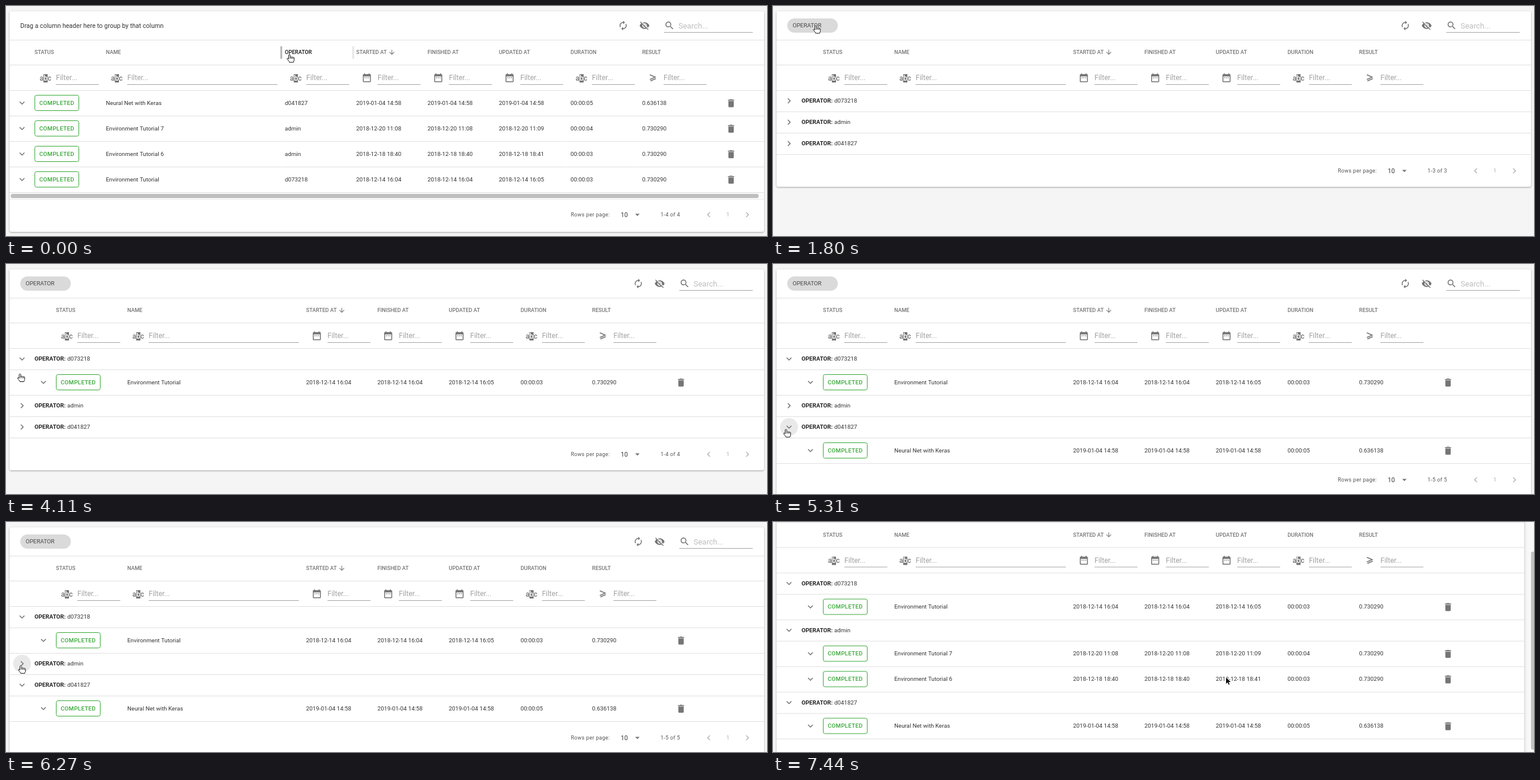
An HTML page with a canvas for the animation above (7470 ms loop, 1280 px wide and 388 px high).

```html
<!DOCTYPE html>
<html lang="en">
<head>
<meta charset="utf-8">
<title>Grouping a data grid</title>
<style>
html, body { margin: 0; width: 100%; height: 100%; overflow: hidden; background: #f5f5f5; }
canvas { display: block; }
</style>
</head>
<body>
<canvas id="stage" width="1280" height="388"></canvas>
<script>
const ctx = document.getElementById('stage').getContext('2d');
const LOOP = 7470;
const DRAG = 450, REORDER = 780, RESTORE = 825, PREVIEW = 1020, DROP = 1530;
const SCROLL = 6690, LEAVE = 6950;
const GREY = '#757575', INK = '#333', LINE = '#e0e0e0', GREEN = '#38a838';

const icons = {
  renew: 'M12 6v3l4-4-4-4v3c-4.42 0-8 3.58-8 8 0 1.57.46 3.03 1.24 4.26L6.7 14.8c-.45-.83-.7-1.79-.7-2.8 0-3.31 2.69-6 6-6zm6.76 1.74L17.3 9.2c.44.84.7 1.79.7 2.8 0 3.31-2.69 6-6 6v-3l-4 4 4 4v-3c4.42 0 8-3.58 8-8 0-1.57-.46-3.03-1.24-4.26z',
  hide: 'M12 7c2.76 0 5 2.24 5 5 0 .65-.13 1.26-.36 1.83l2.92 2.92c1.51-1.26 2.7-2.89 3.43-4.75-1.73-4.39-6-7.5-11-7.5-1.4 0-2.74.25-3.98.7l2.16 2.16C10.74 7.13 11.35 7 12 7zM2 4.27l2.28 2.28.46.46C3.08 8.3 1.78 10.02 1 12c1.73 4.39 6 7.5 11 7.5 1.55 0 3.03-.3 4.38-.84l.42.42L19.73 22 21 20.73 3.27 3 2 4.27zM7.53 9.8l1.55 1.55c-.05.21-.08.43-.08.65 0 1.66 1.34 3 3 3 .22 0 .44-.03.65-.08l1.55 1.55c-.67.33-1.41.53-2.2.53-2.76 0-5-2.24-5-5 0-.79.2-1.53.53-2.2zm4.31-.78l3.15 3.15.02-.16c0-1.66-1.34-3-3-3l-.17.01z',
  search: 'M15.5 14h-.79l-.28-.27C15.41 12.59 16 11.11 16 9.5 16 5.91 13.09 3 9.5 3S3 5.91 3 9.5 5.91 16 9.5 16c1.61 0 3.09-.59 4.23-1.57l.27.28v.79l5 4.99L20.49 19l-4.99-5zm-6 0C7.01 14 5 11.99 5 9.5S7.01 5 9.5 5 14 7.01 14 9.5 11.99 14 9.5 14z',
  date: 'M9 11H7v2h2v-2zm4 0h-2v2h2v-2zm4 0h-2v2h2v-2zm2-7h-1V2h-2v2H8V2H6v2H5c-1.11 0-1.99.9-1.99 2L3 20c0 1.1.89 2 2 2h14c1.1 0 2-.9 2-2V6c0-1.1-.9-2-2-2zm0 16H5V9h14v11z',
  trash: 'M6 19c0 1.1.9 2 2 2h8c1.1 0 2-.9 2-2V7H6v12zM19 4h-3.5l-1-1h-5l-1 1H5v2h14V4z',
  down: 'M16.59 8.59L12 13.17 7.41 8.59 6 10l6 6 6-6z',
  right: 'M10 6L8.59 7.41 13.17 12l-4.58 4.59L10 18l6-6z',
  left: 'M15.41 7.41L14 6l-6 6 6 6 1.41-1.41L10.83 12z',
  caret: 'M7 10l5 5 5-5z',
  sort: 'M20 12l-1.41-1.41L13 16.17V4h-2v12.17l-5.58-5.59L4 12l8 8 8-8z'
};
for (const name in icons) icons[name] = new Path2D(icons[name]);

const pointers = {
  hand: new Path2D('M-1.5 1c0-1.4 2.4-1.4 2.6 0v3.6l.4-.2c.3-.9 2-.8 2.2.1.4-.8 2-.5 2.1.4.5-.6 1.9-.3 1.9.8v3c0 2.2-1 2.3-1.2 4.3H-.3C-.6 11-3 9.5-4 7.3c-.5-1.2.9-1.9 1.7-.9l.8 1z'),
  arrow: new Path2D('M0 0v11l2.6-2.4 1.7 3.9 1.7-.8-1.7-3.7h3.6z'),
  move: new Path2D('M-5 0H5M0-5V5M-1.5-3.5L0-5 1.5-3.5M-1.5 3.5L0 5 1.5 3.5M-3.5-1.5L-5 0-3.5 1.5M3.5-1.5L5 0 3.5 1.5')
};

const UNIT = 120.2;
const columns = [
  ['STATUS', 48, 'text'], ['NAME', 168, 'text'], ['OPERATOR', 469, 'text'],
  ['STARTED AT', 589, 'date'], ['FINISHED AT', 709, 'date'], ['UPDATED AT', 829, 'date'],
  ['DURATION', 949.6, 'text'], ['RESULT', 1070, 'number']
].map(([title, x, kind]) => ({ title, x, kind, width: title === 'NAME' ? 300.6 : UNIT }));

// One entry per run, in column order after the status
const runs = [
  ['Neural Net with Keras', 'd041827', '2019-01-04 14:58', '2019-01-04 14:58', '2019-01-04 14:58', '00:00:05', '0.636138'],
  ['Environment Tutorial 7', 'admin', '2018-12-20 11:08', '2018-12-20 11:08', '2018-12-20 11:09', '00:00:04', '0.730290'],
  ['Environment Tutorial 6', 'admin', '2018-12-18 18:40', '2018-12-18 18:40', '2018-12-18 18:41', '00:00:03', '0.730290'],
  ['Environment Tutorial', 'd073218', '2018-12-14 16:04', '2018-12-14 16:04', '2018-12-14 16:05', '00:00:03', '0.730290']
];
const groups = [
  { operator: 'd073218', opens: 3420 },
  { operator: 'admin', opens: 6480 },
  { operator: 'd041827', opens: 4770 }
];

// Pointer hotspot: time, x, y
const path = [
  [0, 477, 82], [DRAG, 477, 82], [750, 467, 65], [REORDER, 455, 63], [930, 197, 44], [1100, 78, 34],
  [1470, 72, 33], [2430, 72, 33], [2850, 24, 170], [3150, 24, 170], [3240, 24, 168], [3930, 24, 168],
  [4650, 22, 279], [5340, 22, 279], [5850, 25, 242], [LEAVE, 25, 243], [7440, 762, 262]
];

const clamp = v => Math.max(0, Math.min(1, v));
const easeOut = (v, power) => 1 - (1 - clamp(v)) ** power;

function pointerAt(t) {
  const i = path.findIndex(key => key[0] > t);
  if (i < 0) return path[path.length - 1].slice(1);
  const [a, b] = [path[i - 1], path[i]];
  let u = (t - a[0]) / (b[0] - a[0]);
  if (t > DROP) u = u * u * (3 - 2 * u);
  return [a[1] + (b[1] - a[1]) * u, a[2] + (b[2] - a[2]) * u];
}

function text(str, x, middle, size = 9.75, color = INK, weight = 400, spacing = 0) {
  ctx.font = `${weight} ${size}px Roboto, sans-serif`;
  ctx.letterSpacing = spacing + 'px';
  ctx.fillStyle = color;
  ctx.fillText(str, x, middle + size * .355);
}

function icon(name, x, y, color = GREY, size = 18) {
  ctx.save();
  ctx.translate(x - size / 2, y - size / 2);
  ctx.scale(size / 24, size / 24);
  ctx.fillStyle = color;
  ctx.fill(icons[name]);
  ctx.restore();
}

function rect(x, y, w, h, color, radius = 0) {
  ctx.fillStyle = color;
  ctx.beginPath();
  ctx.roundRect(x, y, w, h, radius);
  ctx.fill();
}

const rule = (x1, x2, y, color = LINE) => rect(x1, y, x2 - x1, 1, color);

function chip(x, y, width, pad) {
  rect(x, y, width, 24, '#dadada', 12);
  text('OPERATOR', x + pad, y + 12, 9.75, '#444');
}

function toolbar(t, right) {
  const grouped = t >= PREVIEW;
  if (grouped) {
    ctx.globalAlpha = t < DROP ? .4 : 1;
    chip(24, 21, 85, 9);
    ctx.globalAlpha = 1;
  } else {
    text('Drag a column header here to group by that column', 24, 33, 10.5, INK, 400, .05);
  }
  const x = right - 1275 + (grouped ? 25.5 : 0);
  icon('renew', x + 1038, 33);
  icon('hide', x + 1074, 33);
  icon('search', x + 1116, 33);
  text('Search...', x + 1131, 33, 13, '#bdbdbd');
  rule(x + 1107, right - 19, 44, '#a5a5a5');
  rule(6, right, 57);
}

function filterIcon(kind, x) {
  if (kind === 'date') return icon('date', x + 18, 121);
  if (kind === 'text') {
    text('a', x + 8.5, 121.5, 12, GREY, 500);
    rect(x + 15, 115, 7, 14, GREY);
    text('b', x + 15.2, 121.5, 12, '#fff', 500);
    text('c', x + 22, 121.5, 12, GREY, 500);
    return;
  }
  ctx.strokeStyle = GREY;
  ctx.lineWidth = 1.6;
  ctx.stroke(new Path2D(`M${x + 13} 116l9 4-9 4M${x + 23} 122.5l-9 4`));
}

function header(t, cols) {
  for (const { title, x, width, kind } of cols) {
    const isOperator = title === 'OPERATOR';
    const color = !isOperator ? GREY : t < DRAG ? '#111' : '#ccc';
    text(title, x, 78, 9, color, 500);
    if (title === 'STARTED AT') icon('sort', x + 60, 78, GREY, 13);
    if (isOperator && t < DRAG) {
      rect(x - 7.5, 68, 3, 21, '#b5b5b5');
      rect(x + 113.5, 68, 3, 21, '#e6e6e6');
    }
    filterIcon(kind, x);
    text('Filter...', x + 36, 121, 12, '#a2a2a2');
    rule(x + 36, x + width - 12, 132, '#a5a5a5');
  }
}

function runRow(run, y, cols) {
  const middle = y + 21.5, left = cols[0].x;
  icon('down', left - 21, middle);
  ctx.strokeStyle = GREEN;
  ctx.lineWidth = 1;
  ctx.beginPath();
  ctx.roundRect(left + .5, middle - 13, 74, 26, 3);
  ctx.stroke();
  text('COMPLETED', left + 8, middle, 9.75, GREEN, 500, .25);
  for (const col of cols) {
    const i = columns.findIndex(c => c.title === col.title);
    if (i > 0) text(run[i - 1], col.x, middle);
  }
  icon('trash', cols[cols.length - 1].x + 149.6, middle + .5);
}

function groupRow(group, y, open, [px, py]) {
  const middle = y + 18;
  if (Math.abs(px - 27) < 15 && Math.abs(py - middle) < 16) rect(12, middle - 15, 30, 30, '#e9e9e9', 15);
  icon(open ? 'down' : 'right', 27, middle);
  text('OPERATOR:', 48, middle, 9.75, '#222', 700);
  text(group.operator, 103, middle);
}

function pager(y, count) {
  text('Rows per page:', 950, y, 9, '#555', 400, .3);
  text('10', 1034, y, 10.5);
  icon('caret', 1062, y);
  text(`1-${count} of ${count}`, 1101, y, 9, '#555', 400, .3);
  icon('left', 1182, y, '#b5b5b5');
  text('1', 1211.5, y, 9.75, '#b5b5b5');
  icon('right', 1247, y, '#b5b5b5');
}

function layout(t) {
  if (t < DROP) {
    const forward = easeOut((Math.min(t, RESTORE) - REORDER) / 200, 3);
    const swap = forward * (1 - easeOut((t - RESTORE) / 200, 3));
    const shift = { NAME: UNIT * swap, OPERATOR: -300.6 * swap };
    return columns.map(c => ({ ...c, x: c.x + (shift[c.title] || 0) }));
  }
  const slide = easeOut((t - DROP) / 200, 3);
  return columns.filter(c => c.title !== 'OPERATOR')
    .map(c => ({ ...c, x: c.x + (c.x < 400 ? 36 : 36 - UNIT) * slide }));
}

function tableRows(t) {
  if (t < DROP) return runs.map(run => ({ run, height: 43 }));
  return groups.flatMap(group => {
    const open = t >= group.opens;
    const members = open ? runs.filter(run => run[1] === group.operator) : [];
    return [{ group, open, height: 36 }, ...members.map(run => ({ run, height: 43 }))];
  });
}

function drawPointer(t, [x, y]) {
  const kind = t >= DRAG && t < DROP ? 'move' : t < LEAVE ? 'hand' : 'arrow';
  ctx.save();
  ctx.translate(x, y);
  ctx.lineJoin = 'round';
  ctx.strokeStyle = '#fff';
  ctx.lineWidth = kind === 'move' ? 3 : 1.5;
  ctx.stroke(pointers[kind]);
  ctx.fillStyle = kind === 'hand' ? '#fff' : '#111';
  if (kind !== 'move') ctx.fill(pointers[kind]);
  ctx.strokeStyle = '#111';
  ctx.lineWidth = kind === 'move' ? 1.5 : 1;
  if (kind !== 'arrow') ctx.stroke(pointers[kind]);
  if (kind === 'hand') ctx.stroke(new Path2D('M1.2 4.5v2.5M3.6 5v2M5.8 5.3v1.8'));
  ctx.restore();
}

function draw(t) {
  const pointer = pointerAt(t);
  const cols = layout(t), rows = tableRows(t);
  const flat = t < DROP, overflow = t >= groups[1].opens;
  const right = overflow ? 1263.7 : 1275;
  const scroll = 56.5 * easeOut((t - SCROLL) / 440, 2);
  const bodyEnd = rows.reduce((y, row) => y + row.height, 142);
  const tableEnd = bodyEnd + (flat ? 12 : 0);

  rect(0, 0, 1280, 388, '#f5f5f5');
  ctx.save();
  ctx.translate(0, -scroll);
  ctx.shadowColor = 'rgba(0,0,0,.35)';
  ctx.shadowBlur = 3;
  ctx.shadowOffsetY = 1;
  rect(6, 9, right - 6, tableEnd + 46, '#fff', 3);
  ctx.shadowColor = 'transparent';

  const rowLine = y => {
    if (!flat) return rule(6, right, y);
    rule(6, 42, y);
    for (const { x, width } of cols) rule(x - 6, x - 6 + width, y);
    rule(1184, right, y);
  };

  toolbar(t, right);
  rowLine(99);
  header(t, cols);
  rowLine(142);
  let y = 142;
  for (const { run, group, open, height } of rows) {
    if (run) runRow(run, y, cols);
    else groupRow(group, y, open, pointer);
    y += height;
    rowLine(y);
  }
  if (flat) {
    rect(6, 315, right - 6, 11, '#fafafa');
    rect(8, 317, 1258, 7, '#bfbfbf', 3.5);
    rule(6, right, 326, '#ececec');
  }
  pager(tableEnd + (flat ? 26 : 28), rows.length);
  ctx.restore();

  if (overflow) {
    rect(1269, 0, 11, 388, '#f8f8f8');
    rect(1275, 2 + scroll * .85, 7, 334, '#c1c1c1', 3);
  }
  if (t >= DRAG && t < DROP) chip(pointer[0] - 39, pointer[1] - 11.5, 91, 21.5);
  drawPointer(t, pointer);
}

function tick(now) {
  draw(now % LOOP);
  requestAnimationFrame(tick);
}
requestAnimationFrame(tick);
</script>
</body>
</html>
```
